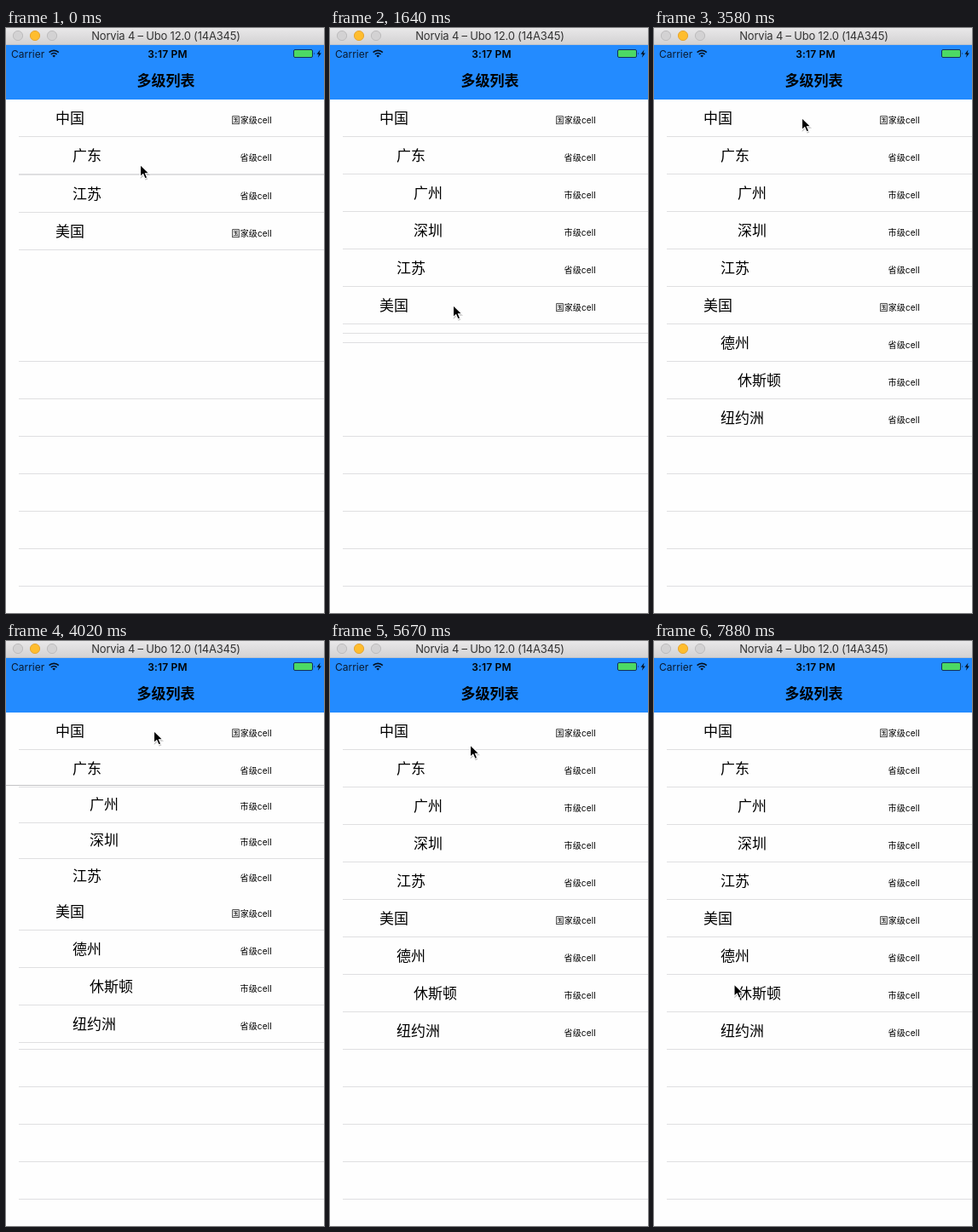
Write an HTML page that moves like this. It is 373 px wide and 687 px high and loops after 8000 ms.

```html
<!DOCTYPE html>
<html lang="zh-CN">
<head>
<meta charset="utf-8">
<title>多级列表</title>
<style>
  html, body { margin: 0; width: 100%; height: 100%; overflow: hidden; background: #fefefe; }
  svg { display: block; font-family: Inter, "Noto Sans CJK SC", "Noto Sans CJK", sans-serif; }
  .name { font-size: 17px; }
  .kind { font-size: 10px; letter-spacing: .15px; }
  .cell { fill: #fefefe; }
  .rule { fill: #dfdfe1; }
</style>
</head>
<body>
<svg width="373" height="687" viewBox="0 0 373 687">
  <defs>
    <linearGradient id="bar" x2="0" y2="1">
      <stop stop-color="#e9e8e9"/><stop offset="1" stop-color="#d2d1d2"/>
    </linearGradient>
  </defs>
  <g id="fillers"></g>
  <g id="list"></g>
  <rect id="edge" width="373" height="1" fill="#c3c3c5"/>

  <rect width="373" height="20" fill="url(#bar)"/>
  <rect y="19" width="373" height="1" fill="#c0c4cb"/>
  <g stroke-width="1">
    <circle cx="14" cy="9" r="5.6" fill="#d3d2d3" stroke="#bdbcbd"/>
    <circle cx="34" cy="9" r="5.6" fill="#ffbd2e" stroke="#e6a532"/>
    <circle cx="54" cy="9" r="5.6" fill="#d3d2d3" stroke="#bdbcbd"/>
  </g>
  <text x="187.5" y="14" font-size="13" letter-spacing="-.2" text-anchor="middle" fill="#333">Norvia 4 – Ubo 12.0 (14A345)</text>

  <rect y="20" width="373" height="64" fill="#238bff"/>
  <text x="6" y="34.5" font-size="12" fill="#0a1a30">Carrier</text>
  <g fill="none" stroke="#06101e" stroke-width="1.7">
    <path d="M50.6 28.6a8 8 0 0 1 11.2 0"/>
    <path d="M52.8 31a5 5 0 0 1 6.8 0"/>
    <path d="M56.2 34.6l-1.8-1.9a2.6 2.6 0 0 1 3.6 0z" fill="#06101e" stroke="none"/>
  </g>
  <text x="189.5" y="34.5" font-size="12" font-weight="600" letter-spacing=".15" text-anchor="middle">3:17 PM</text>
  <rect x="337.5" y="25.5" width="22" height="9" rx="1.5" fill="#4cd964" stroke="#12305a"/>
  <path d="M361 28.5q1.6 1.5 0 3z" fill="#12305a"/>
  <path d="M368.5 25.5l-4 5.2h2.4l-1 4 4-5.3h-2.4z" fill="#06101e"/>
  <text x="187.5" y="68" font-size="17" font-weight="600" text-anchor="middle">多级列表</text>

  <g id="cursor">
    <path d="M.2 1.5v15l3.6-3.2 2.3 5 2.8-1.2-2.2-4.8h4.8z" fill="#000" opacity=".22"/>
    <path d="M0 0v14.2l3.3-3 2.3 5.2 2.6-1.1-2.2-5h4.5z" fill="#000" stroke="#fff" stroke-width="1.1"/>
  </g>
</svg>
<script>
const LOOP = 8000, TOP = 84, ROW = 44, SLIDE = 300;
const $ = id => document.getElementById(id);

// name, depth
const rows = [
  ['中国', 0], ['广东', 1], ['广州', 2], ['深圳', 2], ['江苏', 1],
  ['美国', 0], ['德州', 1], ['休斯顿', 2], ['纽约洲', 1]
];
const kinds = ['国家级cell', '省级cell', '市级cell'];

// start, row ids, true when they open
const changes = [
  [-20, [2, 3], true],
  [1540, [6, 8], true],
  [2650, [7], true],
  [3838, [1, 2, 3, 4], false],
  [4605, [1, 2, 3, 4], true],
  [6818, [6, 7, 8], false],
  [7430, [6, 7, 8], true]
];

// time, x, y of the pointer tip
const path = [
  [480, 157.5, 160.5], [1050, 144.5, 325.5], [1950, 144.5, 325.5], [2390, 152, 362],
  [3010, 152, 362], [3580, 173.5, 105.5], [5600, 173.5, 105.5], [5670, 164.5, 122],
  [6260, 82.5, 350.5], [6410, 82.5, 350.5], [6700, 87, 338], [7740, 87, 338], [7880, 94, 403]
];

// The screen refreshes only at these moments: first, count, last
const ticks = [
  [0, 1, 0], [150, 2, 300], [600, 4, 1050], [1640, 6, 2390], [2690, 7, 3580],
  [3880, 3, 4170], [4620, 3, 4920], [5670, 5, 6260], [6550, 4, 6990], [7140, 6, 7880]
].flatMap(([a, n, b]) => Array.from({ length: n }, (_, i) =>
  Math.round((a + (n > 1 ? i * (b - a) / (n - 1) : 0)) / 10) * 10));

const ease = p => (1 - Math.cos(Math.PI * Math.min(1, Math.max(0, p)))) / 2;

function add(parent, tag, attrs, text = '') {
  const el = document.createElementNS('http://www.w3.org/2000/svg', tag);
  for (const k in attrs) el.setAttribute(k, attrs[k]);
  el.textContent = text;
  return parent.appendChild(el);
}
const rule = (parent, y) => add(parent, 'rect', { class: 'rule', x: 15, y, width: 358, height: 1 });

const cells = rows.map(([name, depth]) => {
  const g = add($('list'), 'g', {});
  add(g, 'rect', { class: 'cell', width: 373, height: ROW });
  rule(g, ROW - 1);
  add(g, 'text', { class: 'name', x: 58 + 20 * depth, y: 28 }, name);
  add(g, 'text', { class: 'kind', x: depth ? 274.5 : 264.5, y: 28 }, kinds[depth]);
  return g;
});
const fillers = Array.from({ length: 13 }, (_, i) => rule($('fillers'), TOP + ROW * (i + 1) - 1));

function drawList(t) {
  let shown = [0, 1, 4, 5], moving = [], opening = true, p = 1;
  for (const [start, ids, open] of changes) {
    if (start > t) break;
    p = ease((t - start) / SLIDE);
    moving = p < 1 ? ids : [];
    opening = open;
    shown = open ? [...shown, ...ids] : shown.filter(id => !ids.includes(id));
  }
  const h = ROW * (opening ? p : 1 - p);
  let y = TOP, k = 0;
  $('edge').style.display = 'none';
  cells.forEach((cell, id) => {
    const slides = moving.includes(id), visible = slides || shown.includes(id);
    cell.style.display = visible ? '' : 'none';
    if (!visible) return;
    const top = Math.round(slides && opening ? y + h - ROW : y);
    cell.setAttribute('transform', `translate(0 ${top})`);
    if (slides && !opening && k++ === 1) {
      $('edge').style.display = '';
      $('edge').setAttribute('y', top - 1);
    }
    y += slides ? h : ROW;
  });
  // Sliding cells tuck under the one before them, fixed cells stay in front
  const fixed = cells.filter((_, id) => !moving.includes(id));
  $('list').append(...moving.map(id => cells[id]).reverse(), ...fixed);
  fillers.forEach((f, i) => f.style.display = i >= shown.length ? '' : 'none');
}

function drawCursor(t) {
  const i = path.findIndex(k => k[0] > t);
  const b = path[i < 0 ? path.length - 1 : i], a = i > 0 ? path[i - 1] : b;
  const p = a === b ? 1 : ease((t - a[0]) / (b[0] - a[0]));
  const [x, y] = [1, 2].map(n => a[n] + (b[n] - a[n]) * p);
  $('cursor').setAttribute('transform', `translate(${x} ${y})`);
}

let last = -1;
function frame(now) {
  const t = now % LOOP, tick = ticks.filter(s => s <= t).pop();
  if (tick !== last) {
    drawList(tick);
    drawCursor(tick);
    last = tick;
  }
  requestAnimationFrame(frame);
}
frame(0);
</script>
</body>
</html>
```
